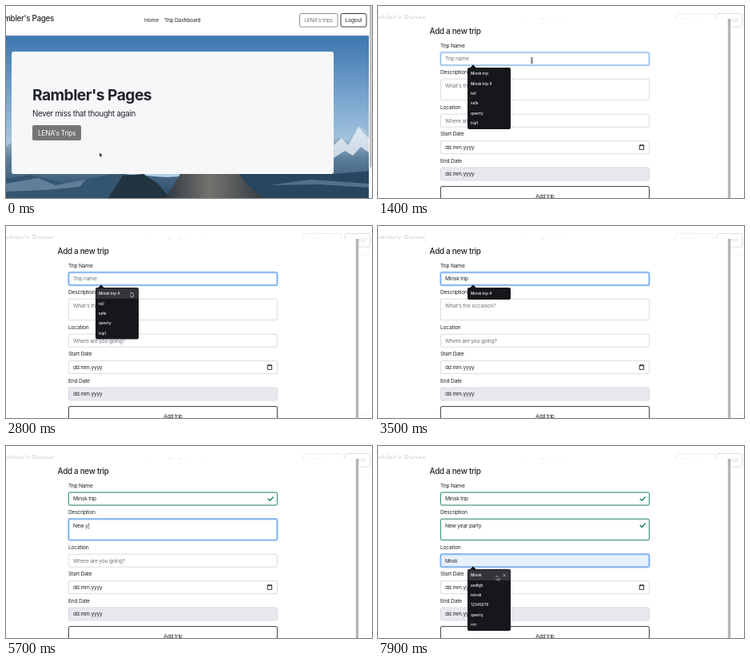
These frames come from a looping animation (458x240 px, 8000 ms). An HTML page:

```html
<!DOCTYPE html>
<html lang="en">
<head>
<meta charset="utf-8">
<title>Trip planner</title>
<style>
html, body { margin: 0; width: 100%; height: 100%; overflow: hidden; background: #fff; }
svg { display: block; width: 458px; height: 240px; }
text { font: 400 6.65px Inter, "Open Sans", sans-serif; letter-spacing: -.03em; fill: #212529; white-space: pre; }
.mid { text-anchor: middle; }
.end { text-anchor: end; }
.brand { font-size: 9.8px; font-weight: 500; }
.h1 { font-size: 19.3px; font-weight: 700; }
.lead { font-size: 9.73px; }
.btn { font-size: 8.4px; fill: #fff; }
.page { font-size: 15.8px; font-weight: 300; }
.sub { font-size: 9.55px; font-weight: 600; }
.title { font-size: 9.9px; font-weight: 500; }
.hint { fill: #6c757d; }
.grey { fill: #757575; }
.box { fill: #fff; stroke: #ced4da; stroke-width: .8; }
.ring { fill: none; stroke: #a8cbf8; stroke-width: 2.4; }
.ring + rect { fill: none; stroke: #6fa6ea; stroke-width: .8; }
.ok rect { fill: none; stroke: #198754; stroke-width: .9; }
.ok path { fill: none; stroke: #198754; stroke-width: 1.5; }
.menu text { font-size: 4.75px; font-weight: 500; letter-spacing: -.01em; fill: #f4f4f5; }

/* one loop is 8 s, so 1% is 80 ms */
.a { animation: 8s step-end infinite; }
.home { animation-name: home; }
.trips { animation-name: trips; }
.veil, .modal { animation: veil 8s linear infinite; }
.modal { animation-name: modal; }
.tripFocus { animation: tripFocus 8s linear infinite; }
.descFocus { animation: descFocus 8s linear infinite; }
.locFocus { animation: locFocus 8s linear infinite; }
.tripOk { animation-name: tripOk; }
.descOk { animation-name: descOk; }
.tripFill { animation-name: tripFill; }
.locFill { animation-name: locFill; }
#all { animation-name: all; }
#rest { animation-name: rest; }
#one { animation-name: one; }
#places { animation-name: places; }
#all .hover { animation-name: tripFill; }
#places .hover { animation-name: locFill; }
#one .hover { opacity: 0; }
.cursor { animation: path 8s linear infinite; }
.arrow { animation-name: arrow; }
.beam { animation-name: beam; }

@keyframes home { 0% { opacity: 1 } 3.7%, 100% { opacity: 0 } }
@keyframes trips { 0% { opacity: 0 } 3.7%, 100% { opacity: 1 } }
@keyframes veil { 0%, 12% { opacity: 0 } 15.5%, 100% { opacity: .83 } }
@keyframes modal {
  0%, 12% { opacity: 0; transform: translateY(-22px); animation-timing-function: ease-out }
  16%, 100% { opacity: 1; transform: none }
}
@keyframes tripFocus { 0%, 16.2% { opacity: 0 } 18.2%, 47.3% { opacity: 1 } 49%, 100% { opacity: 0 } }
@keyframes descFocus { 0%, 48% { opacity: 0 } 49.9%, 88.6% { opacity: 1 } 90.4%, 100% { opacity: 0 } }
@keyframes locFocus { 0%, 88.6% { opacity: 0 } 90.4%, 100% { opacity: 1 } }
@keyframes tripOk { 0% { opacity: 0 } 48.6%, 100% { opacity: 1 } }
@keyframes descOk { 0% { opacity: 0 } 89.9%, 100% { opacity: 1 } }
@keyframes tripFill { 0% { opacity: 0 } 32.4% { opacity: 1 } 34.9%, 100% { opacity: 0 } }
@keyframes locFill { 0% { opacity: 0 } 96.1%, 100% { opacity: 1 } }
@keyframes all { 0% { opacity: 0 } 17.4% { opacity: 1 } 34.9%, 100% { opacity: 0 } }
@keyframes rest { 0% { opacity: 0 } 34.9% { opacity: 1 } 37.4%, 100% { opacity: 0 } }
@keyframes one { 0% { opacity: 0 } 37.4% { opacity: 1 } 47.4%, 100% { opacity: 0 } }
@keyframes places { 0% { opacity: 0 } 89.9%, 100% { opacity: 1 } }
@keyframes arrow {
  0% { opacity: 1 } 15.9% { opacity: 0 } 33% { opacity: 1 } 37.4% { opacity: 0 }
  44.9% { opacity: 1 } 48.9% { opacity: 0 } 93.5%, 100% { opacity: 1 }
}
@keyframes beam {
  0% { opacity: 0 } 15.9% { opacity: 1 } 33% { opacity: 0 } 48.9% { opacity: 1 }
  63.6% { opacity: 0 } 84.9% { opacity: 1 } 93.5%, 100% { opacity: 0 }
}
@keyframes path {
  0%, 1.1% { transform: translate(117px, 183px) }
  2.5%, 5% { transform: translate(80px, 160px); animation-timing-function: ease-in-out }
  11.1%, 13% { transform: translate(390px, 54px); animation-timing-function: ease-in-out }
  16.4%, 23.6% { transform: translate(192.5px, 68px) }
  23.7%, 31.1% { transform: translate(177px, 74px) }
  33.6%, 44.9% { transform: translate(156px, 83px) }
  47% { transform: translate(62px, 148px) }
  49.7%, 84.9% { transform: translate(120px, 105px) }
  88.5%, 92% { transform: translate(132px, 143px) }
  95%, 100% { transform: translate(148.5px, 162px) }
}
</style>
</head>
<body>
<svg viewBox="0 0 458 240" width="458" height="240">
  <defs>
    <linearGradient id="sky" x2="0" y2="1">
      <stop offset="0" stop-color="#3d76af"/>
      <stop offset=".4" stop-color="#7ba7cf"/>
      <stop offset=".75" stop-color="#b4cfe4"/>
    </linearGradient>
    <linearGradient id="hill" x2="0" y2="1">
      <stop offset="0" stop-color="#c3d5e3"/>
      <stop offset=".45" stop-color="#5c7f9d"/>
      <stop offset="1" stop-color="#2b4a66"/>
    </linearGradient>
    <linearGradient id="rock">
      <stop offset="0" stop-color="#2f3a42"/>
      <stop offset=".45" stop-color="#75736f"/>
      <stop offset="1" stop-color="#353d43"/>
    </linearGradient>
    <g id="nav">
      <text x="173" y="19.6">Home</text>
      <text x="198" y="19.6">Trip Dashboard</text>
      <rect x="367.5" y="9.5" width="47.5" height="16.5" rx="2" fill="#fff" stroke="#757575" stroke-width=".8"/>
      <text class="mid grey" x="391" y="20">LENA's trips</text>
      <rect x="419" y="9.5" width="32" height="16.5" rx="2" fill="#fff" stroke="#212529" stroke-width=".9"/>
      <text class="mid" x="435" y="20">Logout</text>
    </g>
  </defs>
  <rect width="458" height="240" fill="#fff"/>

  <g class="a home">
    <rect y="37" width="455" height="203" fill="url(#sky)"/>
    <path d="M0 176L12 166 60 190 120 208 200 214 320 208 390 184 416 163 428 170 441 150 455 160V240H0z" fill="url(#hill)"/>
    <path d="M408 176L420 165 428 174 441 152 455 166V184L444 176 434 187 424 181 410 190z" fill="#e6eef5" opacity=".8"/>
    <path d="M0 216L30 211 75 222 128 211 150 210 170 228 200 240H0z" fill="#345570"/>
    <path d="M0 222L40 215 62 224 100 217 92 226 50 230 0 232z" fill="#7d9bb5" opacity=".6"/>
    <path d="M128 240L146 212 172 210 190 222 205 240z" fill="#22343f"/>
    <path d="M200 240L218 210H292L308 226 322 240z" fill="url(#rock)"/>
    <path d="M322 240L300 222 292 210H410L455 206V240z" fill="#28465f"/>
    <path d="M330 224L380 217 455 222V227L390 223z" fill="#6f8fa9" opacity=".6"/>
    <rect x="7" y="57" width="403" height="153" rx="3" fill="#f7f7fa"/>
    <rect width="455" height="37" fill="#fff"/>
    <path d="M0 36.8H455" stroke="#d5d8dc" stroke-width=".8"/>
    <text class="brand end" x="60" y="19.4">Rambler's Pages</text>
    <use href="#nav"/>
    <text class="h1" x="33" y="118">Rambler's Pages</text>
    <text class="lead" x="33" y="138">Never miss that thought again</text>
    <rect x="33" y="149" width="61" height="19" rx="2" fill="#757575"/>
    <text class="btn mid" x="63.7" y="161.6">LENA's Trips</text>
    <rect x="454" width="4" height="240" fill="#fafafa"/>
    <rect x="455" y="0" width="2.6" height="202" rx="1.3" fill="#bfc0c2"/>
  </g>

  <g class="a trips">
    <rect width="458" height="240" fill="#fff"/>
    <text class="brand end" x="60" y="19.4">Rambler's Pages</text>
    <use href="#nav" x="5"/>
    <path d="M0 36.6H458M0 236.5H458" stroke="#d5d8dc" stroke-width=".9"/>
    <text class="page" x="10" y="60">My trips</text>
    <rect x="369" y="44" width="44" height="19" rx="2" fill="#757575"/>
    <text class="btn mid" x="391" y="56.8">Add trip</text>
    <text class="sub" x="10" y="84">Previous Trips</text>
    <text class="sub" x="217" y="84">Current &amp; Upcoming Trips</text>
  </g>

  <rect class="veil" width="458" height="240" fill="#fff"/>

  <g class="modal">
    <rect y="16" width="441" height="270" fill="#fff"/>
    <rect x="437.8" y="16" width="3.4" height="250" fill="#b4b5b7"/>
    <text class="title" x="64.5" y="34.5">Add a new trip</text>
    <text x="78" y="51.8">Trip Name</text>
    <text x="78" y="85.3">Description</text>
    <text x="78" y="129.3">Location</text>
    <text x="78" y="162.4">Start Date</text>
    <text x="78" y="196">End Date</text>
    <g class="box">
      <rect x="78.4" y="58" width="261" height="16" rx="1.6"/>
      <rect x="78.4" y="91.2" width="261" height="26.4" rx="1.6"/>
      <rect x="78.4" y="135.2" width="261" height="16" rx="1.6"/>
      <rect x="78.4" y="168.6" width="261" height="16" rx="1.6"/>
      <rect x="78.4" y="202" width="261" height="16" rx="1.6" fill="#e8e9ee"/>
    </g>
    <rect x="78.4" y="225.6" width="261" height="22" rx="1.6" fill="#fff" stroke="#212529" stroke-width=".9"/>
    <text class="mid" x="209" y="239.8">Add trip</text>

    <g class="a ok tripOk"><rect x="78.4" y="58" width="261" height="16" rx="1.6"/><path d="M327.8 65.8l2.4 2.4 4.5-4.8"/></g>
    <g class="a ok descOk"><rect x="78.4" y="91.2" width="261" height="26.4" rx="1.6"/><path d="M327.8 99l2.4 2.4 4.5-4.8"/></g>
    <rect class="a tripFill" x="78.8" y="58.4" width="260.2" height="15.2" rx="1.2" fill="#e8f0fe"/>
    <rect class="a locFill" x="78.8" y="135.6" width="260.2" height="15.2" rx="1.2" fill="#e8f0fe"/>
    <g class="tripFocus"><rect class="ring" x="78.4" y="58" width="261" height="16" rx="2"/><rect x="78.4" y="58" width="261" height="16" rx="1.6"/></g>
    <g class="descFocus"><rect class="ring" x="78.4" y="91.2" width="261" height="26.4" rx="2"/><rect x="78.4" y="91.2" width="261" height="26.4" rx="1.6"/></g>
    <g class="locFocus"><rect class="ring" x="78.4" y="135.2" width="261" height="16" rx="2"/><rect x="78.4" y="135.2" width="261" height="16" rx="1.6"/></g>

    <text id="trip" x="84" y="68.4"></text>
    <text id="desc" x="84" y="102"></text>
    <text id="loc" x="84" y="145.6"></text>
    <text x="84" y="179">dd.mm.yyyy</text>
    <text x="84" y="212.4">dd.mm.yyyy</text>
    <path d="M327.2 174h5.4v5.4h-5.4zM327.2 174.6h5.4M328.5 172.8v1.2M331.3 172.8v1.2" fill="none" stroke="#212529" stroke-width=".9"/>
  </g>

  <g id="menus"></g>

  <g class="cursor">
    <path class="a arrow" d="M0 0V5.6L1.3 4.4 2.2 6.4 3.1 6 2.2 4.1H4z" fill="#000" stroke="#fff" stroke-width=".5"/>
    <path class="a beam" d="M-1.3-3.6Q0-3.6 0-2.6V2.6Q0 3.6-1.3 3.6M1.3-3.6Q0-3.6 0-2.6V2.6Q0 3.6 1.3 3.6M-.8 .8H.8" fill="none" stroke="#222" stroke-width=".7"/>
  </g>
</svg>
<script>
const LOOP = 8000, ROW = 12.4;
const $ = id => document.getElementById(id);

// Suggestion list hanging below a field
function menu(id, top, items) {
  const rows = items.map((s, i) => `<text x="116" y="${top + 9.2 + i * ROW}">${s}</text>`).join('');
  $('menus').insertAdjacentHTML('beforeend', `<g id="${id}" class="a menu">
    <path d="M115 ${top + .5}l4-4.2 4 4.2z" fill="#16171b"/>
    <rect x="112" y="${top}" width="54" height="${items.length * ROW + 2.6}" rx="2" fill="#16171b"/>
    <g class="a hover"><rect x="112.6" y="${top + 1}" width="52.8" height="${ROW + .6}" rx="1.6" fill="#34353a"/>
    <path d="M156.6 ${top + 6}l3.2 3.2m0-3.2l-3.2 3.2" stroke="#d0d0d2" stroke-width=".7"/></g>${rows}</g>`);
}

const names = ['Minsk trip', 'Minsk trip 4', 'tell', 'safa', 'qwerty', 'trip1'];
menu('all', 77, names);
menu('rest', 77, names.slice(1));
menu('one', 77, names.slice(1, 2));
menu('places', 154, ['Minsk', 'asdfgh', 'minsk', '12345678', 'qwerty', 'rrrr']);

// [time, letters typed so far]
const strokes = [[5090, 1], [5190, 2], [5290, 3], [5490, 4], [5690, 5], [5790, 6],
  [5890, 7], [5990, 8], [6090, 10], [6190, 12], [6290, 14]];

function tripText(t) {
  if (t >= 2590 && t < 2790) return names[0];
  return t < 2990 ? '' : names[0].slice(0, 1 + Math.floor((t - 2990) / 50));
}

function descText(t) {
  const count = strokes.reduce((n, [at, len]) => t >= at ? len : n, 0);
  return 'New year party'.slice(0, count);
}

function put(id, value, hint, caret) {
  const el = $(id), text = (value || hint) + (caret ? '|' : '');
  if (el.textContent !== text) el.textContent = text;
  el.classList.toggle('hint', !value);
}

function draw(t) {
  put('trip', tripText(t), 'Trip name');
  put('desc', descText(t), "What's the occasion?", t >= 5090 && t < 6790);
  const place = t >= 7690 ? 'Minsk' : '';
  put('loc', place, 'Where are you going?');
  $('loc').style.fontSize = place ? '5.7px' : '';
}

let start;
function tick(now) {
  start ??= now;
  draw((now - start) % LOOP);
  requestAnimationFrame(tick);
}
draw(0);
requestAnimationFrame(tick);
</script>
</body>
</html>
```
